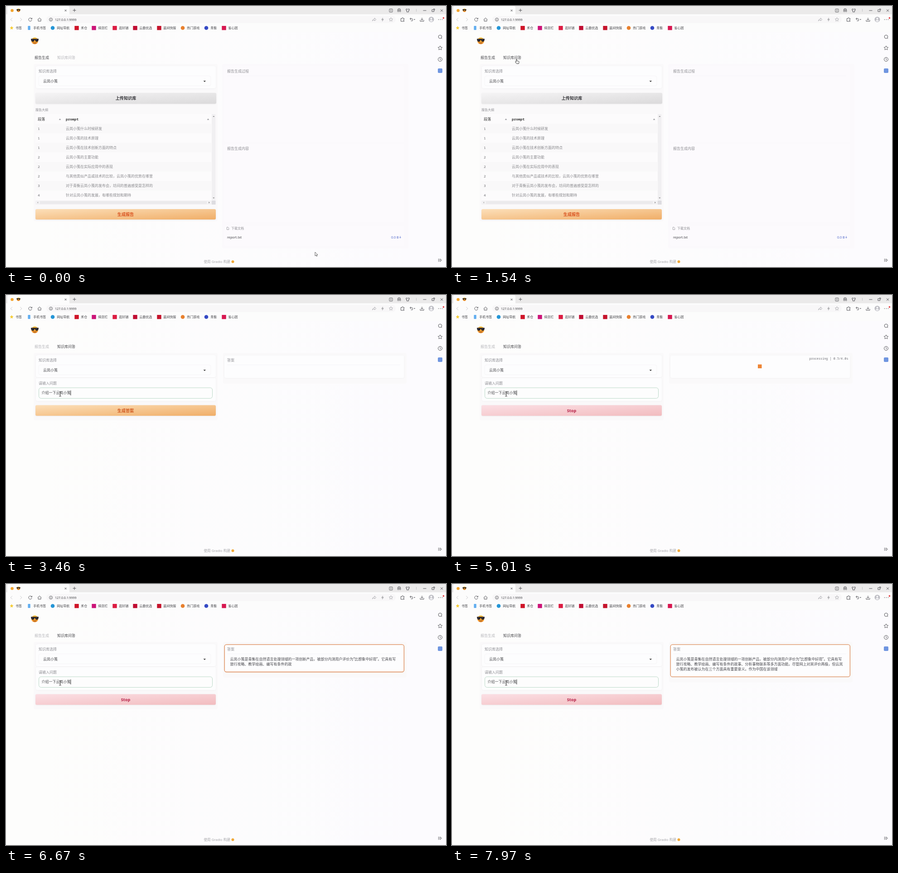
Animation, 971 px wide and 577 px high, one loop 8 s. Source, as an HTML page with a canvas:

```html
<!DOCTYPE html>
<html lang="zh-CN">
<head>
<meta charset="utf-8">
<title>知识库问答</title>
<style>
html, body { margin: 0; width: 100%; height: 100%; overflow: hidden; background: #fdfcfd; }
canvas { display: block; width: 971px; height: 577px; }
</style>
</head>
<body>
<canvas id="stage" width="971" height="577"></canvas>
<script>
const ctx = document.getElementById('stage').getContext('2d');
const SANS = '"Noto Sans", "Noto Sans CJK SC", "Noto Sans CJK", sans-serif';
const MONO = '"Noto Sans Mono", "Noto Sans CJK SC", "Noto Sans CJK", monospace';
const LOOP = 8000;
const T = { hover: 1000, open: 1880, focus: 2710, paste: 3430, run: 4480, reply: 5250 };
const PRODUCT = '云岚小笺', COMPANY = '青衡';
const DARK = '#444448', GREY = '#8c8c91', PALE = '#b5b5b9';

const backdrop = ctx.createLinearGradient(0, 0, 971, 0);
backdrop.addColorStop(0, '#fdfdfc');
backdrop.addColorStop(1, '#fcfbfe');

const bookmarks = [
  [51, '#62aef0', '手机书签', 'phone'], [103, '#2495d6', '网址导航', 'dot'],
  [156, '#cf1528', '禾仓'], [194, '#cc1478', '绮货栏'], [240, '#dc1c42', '逛好铺'],
  [285, '#c00d32', '云鹿优选'], [338, '#c5142c', '晨间快报'],
  [390, '#e8802d', '热门游戏', 'dot'], [442, '#3449c4', COMPANY, 'dot'], [481, '#d71750', '省心团']
];
const outline = [
  [1, PRODUCT + '什么时候研发'], [1, PRODUCT + '的技术原理'],
  [1, PRODUCT + '在技术创新方面的特点'], [2, PRODUCT + '的主要功能'],
  [2, PRODUCT + '在实际应用中的表现'],
  [2, '与其他类似产品或技术的比较，' + PRODUCT + '的优势在哪里'],
  [3, '对于' + COMPANY + PRODUCT + '的发布会，坊间的普遍感受是怎样的'],
  [4, '针对' + PRODUCT + '的发展，有哪些规划和期待']
];
const answer = [
  PRODUCT + '是' + COMPANY + '在自然语言处理领域的一项创新产品，被部分内测用户评价为“比想象中好用”。它具有写',
  '旅行攻略、教学绘画、编写有条件的故事、分析事物联系等多方面功能。尽管网上对其评价两极，但' + PRODUCT.slice(0, 2),
  PRODUCT.slice(2) + '的发布被认为在三个方面具有重要意义。作为中国在该领域'
];

const ease = p => p * p * (3 - 2 * p);

// Interpolates through rows of [time, ...values].
function track(keys, t, curve = p => p) {
  if (t <= keys[0][0]) return keys[0].slice(1);
  for (let i = 1; i < keys.length; i++) {
    const a = keys[i - 1], b = keys[i];
    if (t < b[0]) {
      const p = curve((t - a[0]) / (b[0] - a[0]));
      return a.slice(1).map((v, k) => v + (b[k + 1] - v) * p);
    }
  }
  return keys[keys.length - 1].slice(1);
}

function text(s, x, y, size = 8, color = DARK, { weight = 400, align = 'left', font = SANS } = {}) {
  ctx.font = `${weight} ${size}px ${font}`;
  ctx.textAlign = align;
  ctx.fillStyle = color;
  ctx.fillText(s, x, y + size * 0.37);
}

function box(x, y, w, h, fill, r = 0, stroke, lw = 1) {
  ctx.beginPath();
  ctx.roundRect(x, y, w, h, r);
  if (fill) { ctx.fillStyle = fill; ctx.fill(); }
  if (stroke) { ctx.strokeStyle = stroke; ctx.lineWidth = lw; ctx.stroke(); }
}

function disc(x, y, r, fill, stroke, lw = 1) {
  ctx.beginPath();
  ctx.arc(x, y, r, 0, 7);
  if (fill) { ctx.fillStyle = fill; ctx.fill(); }
  if (stroke) { ctx.strokeStyle = stroke; ctx.lineWidth = lw; ctx.stroke(); }
}

// Draws an SVG path placed at x, y.
function shape(d, x, y, stroke, fill, lw = 1) {
  const p = new Path2D(d);
  ctx.save();
  ctx.translate(x, y);
  if (fill) { ctx.fillStyle = fill; ctx.fill(p); }
  if (stroke) { ctx.strokeStyle = stroke; ctx.lineWidth = lw; ctx.stroke(p); }
  ctx.restore();
}

function star(x, y, r, stroke, fill) {
  ctx.beginPath();
  for (let i = 0; i < 10; i++) {
    const a = i * Math.PI / 5 - Math.PI / 2, q = i % 2 ? r * 0.48 : r;
    ctx.lineTo(x + q * Math.cos(a), y + q * Math.sin(a));
  }
  ctx.closePath();
  if (fill) { ctx.fillStyle = fill; ctx.fill(); }
  if (stroke) { ctx.strokeStyle = stroke; ctx.lineWidth = 0.9; ctx.stroke(); }
}

function coolFace(x, y, r) {
  ctx.save();
  ctx.translate(x, y);
  ctx.scale(r / 8, r / 8);
  const g = ctx.createLinearGradient(0, -8, 0, 8);
  g.addColorStop(0, '#fbc33c');
  g.addColorStop(1, '#ee8a2b');
  disc(0, 0, 7.6, g);
  shape('M-8.4-4.6H8.4V-2.5Q7.5 2 4.2 2Q1.3 2 .6-2H-.6Q-1.3 2-4.2 2Q-7.5 2-8.4-2.5Z', 0, 0, null, '#252229');
  shape('M-6-3.2L-3.8-1M2.6-3.2L4.8-1', 0, 0, '#65606c', null, 0.9);
  shape('M-3.4 3.6Q0 6.4 3.4 3.6', 0, 0, '#7b3f18', null, 1.1);
  ctx.restore();
}

// Gradient from the top left corner to the bottom right, as CSS lays it out.
function cornerGradient(x, y, w, h, from, to) {
  const k = w * h / (w * w + h * h), cx = x + w / 2, cy = y + h / 2;
  const g = ctx.createLinearGradient(cx - h * k, cy - w * k, cx + h * k, cy + w * k);
  g.addColorStop(0, from);
  g.addColorStop(1, to);
  return g;
}

function button(x, y, w, h, label, from, to, color) {
  ctx.save();
  ctx.shadowColor = 'rgba(60,50,60,.1)';
  ctx.shadowBlur = 2;
  ctx.shadowOffsetY = 0.7;
  box(x, y, w, h, cornerGradient(x, y, w, h, from, to), 3);
  ctx.restore();
  text(label, x + w / 2, y + h / 2, 9.1, color, { weight: 700, align: 'center' });
}

function card(x, y, w, h) {
  ctx.save();
  ctx.shadowColor = 'rgba(70,60,90,.06)';
  ctx.shadowBlur = 3;
  ctx.shadowOffsetY = 0.5;
  box(x, y, w, h, '#fdfdfe', 4);
  ctx.restore();
}

function browser() {
  const ink = '#55555a', soft = '#a9a9ad';
  box(0, 0, 971, 18.5, '#ebeaea');
  box(3, 0, 137, 19, '#fcfcfc', [4, 4, 0, 0]);
  box(0, 18.5, 971, 39, '#fcfcfc');
  box(89, 22, 771, 15.5, '#f8f7f8', 7);
  disc(13.5, 10, 3.3, '#f2a52f');
  coolFace(27.5, 9.5, 4);
  shape('M-2-2L2 2M2-2L-2 2', 131.5, 10, ink);
  shape('M-3.5 0H3.5M0-3.5V3.5', 151, 9.5, ink);

  box(846, 6.5, 7, 7, null, 1, ink, 0.9);
  shape('M0-1.8V1.8', 849.5, 10, ink);
  shape('M-4-.5H4M-2.5-.5L-2-3.5H2L2.5-.5', 867.5, 9.5, ink);
  disc(865.5, 11.5, 1.4, null, ink, 0.9);
  disc(869.7, 11.5, 1.4, null, ink, 0.9);
  shape('M-3.5-3H-1.5Q0-1.5 1.5-3H3.5V0H2V3.5H-2V0H-3.5Z', 886.5, 9.7, ink);
  shape('M0-3V3', 905.5, 9.5, '#c4c4c6');
  shape('M-3.5 0H3.5', 924, 10, ink);
  shape('M-3-1.5H1.5V3H-3ZM0-3H3V0', 943, 9.5, ink);
  shape('M-2.5-2.5L2.5 2.5M2.5-2.5L-2.5 2.5', 961.5, 10, ink);

  shape('M2-3.5L-2 0L2 3.5', 12, 30, '#cfcfd2');
  shape('M-2-3.5L2 0L-2 3.5', 33, 30, '#cfcfd2');
  shape('M3.3-1.5A3.6 3.6 0 1 0 3.5 1M3.8-3.8V-1.2H1.2', 53.5, 30, ink);
  shape('M-4 0L0-3.7L4 0M-3-.5V3.5H3V-.5', 74, 30, ink);
  disc(99, 30, 3.5, null, ink, 0.9);
  shape('M0-.5V2M0-2V-1.2', 99, 30, ink);
  text('127.0.0.1:9999', 108, 30, 7, '#444448');

  shape('M-4 3Q-3-1.5 1-1.5V-3.5L4.2-.2L1 3V1Q-2 .8-4 3Z', 812.5, 30, soft, null, 0.9);
  shape('M.5-4L-2.5.7H0L-.7 4L2.5-1H0Z', 831, 30, soft, soft, 0.5);
  star(849.5, 30, 4.3, soft);
  shape('M-3.5-2.5H-1Q-1-4.3.3-4.3Q1.5-4.3 1.5-2.5H3.5V0Q1.8.2 1.8 1.2Q1.8 2.2 3.5 2.2V4H-3.5Z', 875, 30, ink);
  shape('M-1.5-4L-4-1.7L-1.5.6M-4-1.7H1.3Q3 0 1.5 2.8H-2', 895.5, 30, ink);
  shape('M-1.6-1H1.6L0 1Z', 901.5, 30, null, ink);
  shape('M0-4V1.4M-2.5-1L0 1.5L2.5-1M-4 1V3.8H4V1', 918, 30, ink);
  disc(938.5, 29.7, 6, '#bebec4');
  disc(938.5, 28, 2.2, '#f4f4f6');
  shape('M-3.6 3Q-3 .7 0 .7Q3 .7 3.6 3Q0 6 -3.6 3Z', 938.5, 30, null, '#f4f4f6');
  for (let i = 0; i < 3; i++) disc(954.5 + i * 4, 30, 0.8, ink);
  disc(965.5, 26.5, 1.8, '#e5393c');

  star(12.5, 48.5, 4.2, null, '#f5cc33');
  text('书签', 21, 48.5, 7);
  for (const [x, color, label, kind] of bookmarks) {
    if (kind === 'dot') disc(x, 48.5, 4.3, color);
    else if (kind === 'phone') box(x - 2.7, 44, 5.4, 9, color, 1);
    else box(x - 4.7, 44, 9.4, 9.2, color, 0.5);
    text(label, x + 9.2, 48.5, 7);
  }

  disc(958, 68, 3.8, null, ink);
  shape('M2.5 2.5L4.2 4.2', 958, 68, ink);
  star(958, 93, 5, ink);
  disc(958, 118, 4.4, null, ink);
  shape('M0-2.6V.3L1.8 1.5', 958, 118, ink);
  box(953, 138, 10, 10, '#6f95e0', 2);
  shape('M-3.5-3.5V3.5M-.5-3L3.5 0L-.5 3Z', 958, 562, ink, null, 0.9);
}

function pageFrame(t) {
  const second = t >= T.open;
  coolFace(63.5, 77, 8);
  text('报告生成', 63, 114.5, 8, second ? PALE : DARK);
  text('知识库问答', 113, 114.5, 8, t >= T.hover ? DARK : PALE);
  text('使用 Gradio 构建', 436.5, 565.5, 7.6, '#a6a6aa');
  disc(500.5, 565.3, 3, '#f0a838');
}

function picker() {
  card(66, 133, 397, 49);
  text('知识库选择', 72, 144.5, 8, GREY);
  box(72, 154.5, 380, 22, '#fdfdfe', 4, '#f6f5f7');
  text(PRODUCT, 82, 166, 8);
  shape('M-2.8-1.3H2.8L0 1.6Z', 438.3, 166.5, null, '#333');
}

function reportPage() {
  box(61, 128, 406, 348, '#faf9fa', 4);
  picker();
  button(65, 192, 399, 24, '上传知识库', '#f5f4f5', '#dbdadb', '#333337');
  text('报告大纲', 65, 229.5, 7, GREY);

  box(65, 239, 398, 200, '#fcfbfc', 3);
  text('段落', 70, 250, 8, '#333', { weight: 500 });
  text('prompt', 132, 250, 7.8, '#333', { weight: 700, font: MONO });
  for (const x of [119, 446]) shape('M-2.4 1.7L0-1.8L2.4 1.7Z', x, 250.3, null, '#a3a3a8');
  outline.forEach(([n, s], i) => {
    const y = 271 + i * 21.05;
    if (i % 2 === 0) box(65, y - 10.5, 388, 21, '#f9f8f9');
    text(n, 70, y, 7.8, '#6a6a6e', { font: MONO });
    text(s, 132, y, 8, '#88888c');
  });
  box(454, 239, 8.5, 190, '#f1f0f2');
  box(65, 430, 398, 9, '#f3f2f4');
  box(75, 431.5, 368, 6, '#ebeaec');
  box(454, 430, 8.5, 9, '#dddce0');
  shape('M-2 1L0-1L2 1Z', 458.3, 244, null, '#777');
  shape('M-2-1L0 1L2-1Z', 458.3, 424.5, null, '#777');
  shape('M1-2L-1 0L1 2Z', 70, 434.5, null, '#aaa');
  shape('M-1-2L1 0L-1 2Z', 448.5, 434.5, null, '#777');
  button(65, 449, 398, 23, '生成报告', '#fcdfb9', '#f0ae68', '#d9521f');

  box(477, 128, 411, 408, '#fbf9fc', 4);
  box(482, 133, 397, 168, '#fcfafd', 4);
  box(482, 305, 397, 173, '#fcfafd', 4);
  box(482, 486, 397, 45, '#fcfafd', 4);
  text('报告生成过程', 488, 144.5, 8, GREY);
  box(488, 154, 382, 1, '#f7f5f9');
  text('报告生成内容', 488, 315.5, 8, GREY);
  shape('M-2-2.8H.5L2.2-1V2.8H-2Z', 489.5, 491.7, '#929297', null, 0.8);
  text('下载文档', 497, 491.5, 7, GREY);
  text('report.txt', 488, 511, 7.2);
  text('0.0 B', 850, 511, 7.2, '#4a63c8');
  shape('M0-2.3V2M-1.6.5L0 2.1L1.6.5', 870, 511, '#4a63c8', null, 0.8);
}

function caretOn(t) {
  if (t < T.focus) return false;
  if (t < T.paste) return t < 3210;
  return Math.floor((t - 3440) / 530) % 2 <= 0;
}

function questionPage(t) {
  box(61, 128, 406, 149, '#faf9fa', 4);
  picker();
  card(66, 183.5, 397, 51);
  text('请输入问题', 72, 194.7, 8, GREY);
  box(72.5, 205, 383, 23.5, '#fdfdfd', 5, t >= T.focus ? '#bcdac9' : '#e6e5e9');
  if (t >= T.paste) text('介绍一下' + PRODUCT, 78.5, 216.5, 8);
  if (caretOn(t)) box(t < T.paste ? 78 : 142.3, 211, 1, 11, '#333');

  if (t < T.run) button(65, 243.5, 398, 23.5, '生成答案', '#fcdfb9', '#f0ae68', '#cf551c');
  else button(65, 243.5, 398, 23.5, 'Stop', '#fbdfe4', '#f2bcbf', '#b51c43');
  answerPanel(t);
}

function answerPanel(t) {
  const keys = [[T.reply, 0], [6170, 43], [7380, 93], [7970, 121], [LOOP, 121]];
  let left = Math.round(track(keys, t)[0]);
  const shown = answer.map(line => {
    const part = line.slice(0, Math.max(0, left));
    left -= line.length;
    return part;
  });
  const rows = Math.max(1, shown.filter(Boolean).length);
  const h = 50 + (rows - 1) * 10.7;
  box(479, 128, 405, h + 18, '#faf9fa', 4);
  card(482, 133.5, 396.5, h);

  if (t >= T.run && t < T.reply) {
    const secs = Math.max(0, (t - 4500) / 1000).toFixed(1);
    text(`processing | ${secs}/4.0s`, 874.5, 140.5, 6.83, '#6c6c71', { align: 'right', font: MONO });
    box(675, 153.5, 8.5, 8.5, '#ee8434');
    return;
  }
  text('答案', 488, 144.5, 8, GREY);
  box(488, 154, 382, 1, '#f5f4f7');
  shown.forEach((line, i) => text(line, 494.5, 166 + i * 10.9, 8, '#45454a'));
  if (t >= T.reply) {
    const pulse = (1 + Math.cos((t - T.reply) / 1000 * Math.PI)) / 2;
    ctx.globalAlpha = 0.75 + 0.25 * pulse;
    box(482.2, 133.8, 396.2, h, null, 4.5, '#d97434', 1.3);
    ctx.globalAlpha = 1;
  }
}

function pointer(t) {
  const path = [[60, 682, 544], [830, 166, 158], [880, 166, 158], [1080, 141, 117],
    [2000, 141, 117], [2600, 119.5, 219]];
  const [x, y] = track(path, t, ease);
  if (t >= T.open && y > 204) {
    shape('M-2.2-5H-.6L0-4.4L.6-5H2.2M0-4.4V4.4M-2.2 5H-.6L0 4.4L.6 5H2.2', x, y, '#222', null, 1);
  } else if (y < 124 && x < 160) {
    shape('M.5.8Q1.5-.3 2.3.8V4.4L6 5.1Q7.2 5.5 7 7L6.3 10.5H1.5L-1.2 7Q-1.5 5.8-.4 5.9L.6 6.8Z', x, y, '#333', '#fff', 0.9);
  } else {
    shape('M0 0V8.4L2 6.6L3.4 9.5L4.7 8.9L3.4 6.1H6Z', x, y, '#555', '#fff', 0.9);
  }
}

function draw(now) {
  const t = now % LOOP;
  ctx.fillStyle = backdrop;
  ctx.fillRect(0, 0, 971, 577);
  browser();
  pageFrame(t);
  if (t < T.open) reportPage();
  else questionPage(t);
  pointer(t);
  requestAnimationFrame(draw);
}
requestAnimationFrame(draw);
</script>
</body>
</html>
```
